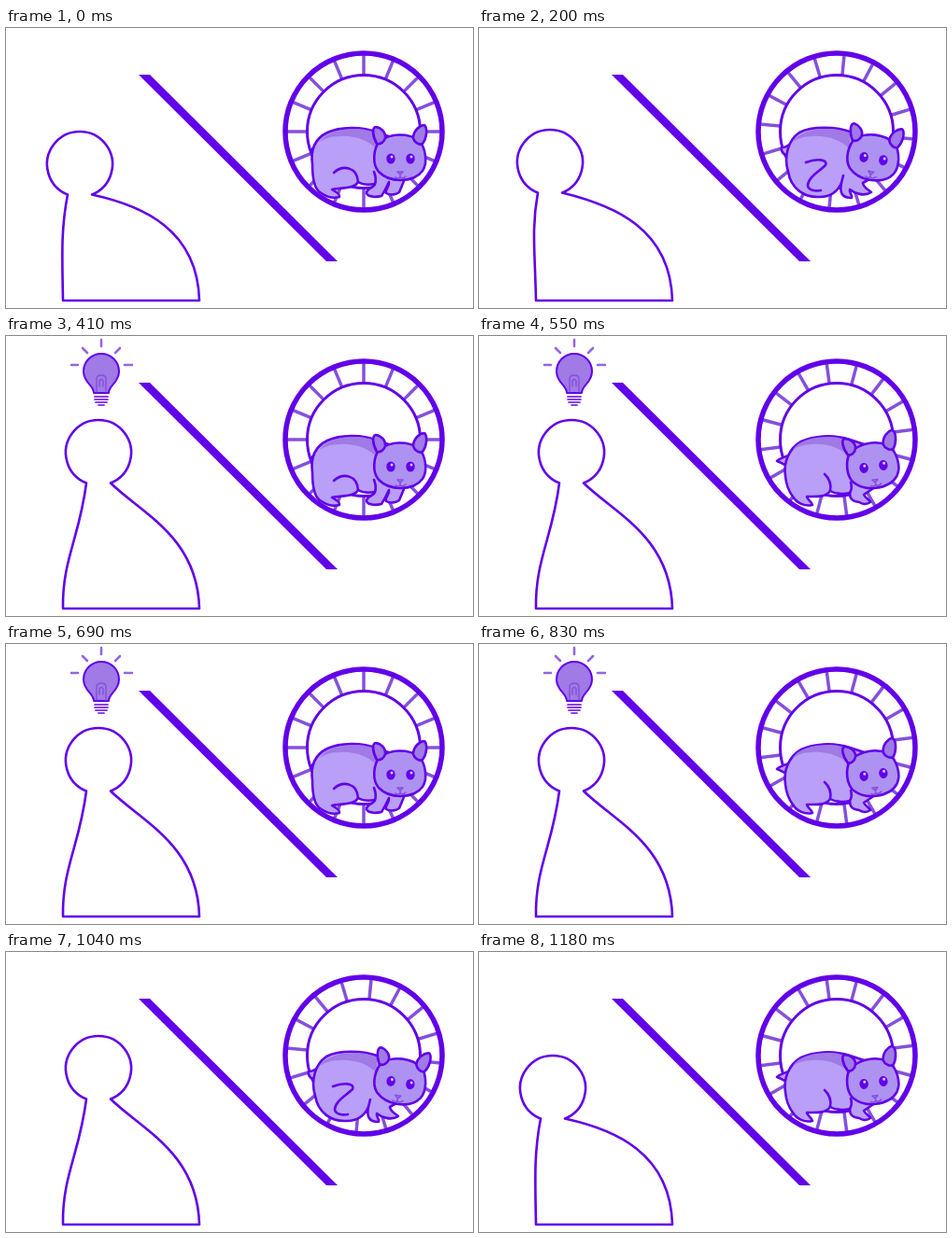
These frames come from a looping animation (500x300 px, 1380 ms). An HTML page:

```html
<!DOCTYPE html>
<html lang="en">
<meta charset="utf-8">
<title>Thinking and running</title>
<style>
html, body { margin: 0; width: 100%; height: 100%; overflow: hidden; background: #fff; }
svg { display: block; width: 500px; height: 300px; }
.line { fill: none; stroke: #6200ea; stroke-width: 2.6; stroke-linecap: round; stroke-linejoin: round; }
.light { fill: #b99ff8; }
.mid { fill: #a07ae5; }
.pale { stroke: #8550dc; }
</style>
<svg viewBox="0 0 500 300">
  <path id="bust" class="line"/>

  <g id="bulb" class="line">
    <path stroke="#9566e0" d="M102 4V11M82 13L87 18M122 13L117 18M70 31H77M127 31H135"/>
    <path class="mid" style="stroke-width:2" d="M94 61C94 53 83 50 83 38A19 19 0 0 1 121 38C121 50 110 53 110 61Z"/>
    <path class="pale" style="stroke-width:1.4" d="M97 60V46Q97 42 102 42T107 46V60M100 54V48Q102 45 104 48V54"/>
    <path style="stroke-width:1.7" d="M95 65H109M95 68H109M96 71H108M99 74H105"/>
  </g>

  <path fill="#6200ea" d="M142 50H154L355 250H343Z"/>

  <g class="line">
    <g id="spokes" class="pale" style="stroke-width:3.5;stroke-linecap:butt"></g>
    <circle cx="383" cy="111" r="84" style="stroke-width:5.5"/>
    <circle cx="383" cy="111" r="60.5" style="stroke-width:3"/>
  </g>

  <g class="line">
    <path id="tail" class="light"/>
    <path id="body" class="light"/>
    <path class="mid" stroke="none" d="M336 122C342 112 358 108 374 108C383 108 391 110 397 113V130C388 120 373 115 357 116C347 116 341 119 336 122Z"/>
    <path id="crease"/>
    <g id="head">
      <path fill="#ae92f2" d="M400 121C393 130 392 146 399 154C406 161 414 163 422 163C432 163 441 160 446 153C452 144 449 128 442 120C429 112 412 113 400 121Z"/>
      <path class="mid" d="M397 124C392 115 392 106 396 106C402 107 407 112 406 118C405 122 401 125 397 124Z"/>
      <path class="mid" d="M436 118C436 110 443 104 448 104C452 108 450 119 446 124C442 126 437 122 436 118Z"/>
      <g fill="#6200ea" stroke="none">
        <ellipse cx="412" cy="140" rx="4.7" ry="5.5"/>
        <ellipse cx="433" cy="140" rx="4.7" ry="5.5"/>
      </g>
      <g fill="#d9c9ff" stroke="none">
        <circle cx="413" cy="138" r="1.5"/>
        <circle cx="434" cy="138" r="1.5"/>
      </g>
      <path style="stroke-width:1.6" class="pale" d="M419 154H425L422 157ZM422 157V160M417 160Q420 162 422 160Q425 162 428 159"/>
    </g>
  </g>
</svg>
<script>
const $ = id => document.getElementById(id);
const LOOP = 1380, HOLD = 200, STEP = 70, LAST = 15;

// Wheel turn and head tilt in degrees, then the hamster's outlines
const poses = [
  {
    turn: 0,
    tilt: 0,
    tail: "M331 128Q326 128 328 137",
    body: "M397 112C381 105 357 106 344 112C330 119 326 132 328 146C328 157 329 171 336 176C343 181 350 183 357 181C358 177 352 175 349 173C362 171 373 172 377 165C382 168 390 168 395 167C394 172 386 171 386 177C388 182 398 181 402 180C406 174 408 169 410 165C411 171 405 173 407 177C412 180 418 178 421 176C423 171 426 165 428 158L438 125Z",
    crease: "M351 155C361 146 376 149 377 165M394 154Q397 162 395 167"
  },
  {
    turn: 5.6,
    tilt: 9,
    tail: "M332 136C327 137 323 133 324 128C328 128 332 126 335 122Z",
    body: "M400 112C382 105 356 105 343 112C331 120 326 138 331 154C334 172 348 182 365 181C376 181 384 175 388 166C386 176 388 182 399 182C400 178 396 177 397 173C402 177 412 181 420 176C416 172 412 172 411 166L430 155L438 125Z",
    crease: "M350 144C360 140 374 140 371 147C364 154 352 160 352 169C353 174 360 175 366 174M388 166L390 158"
  },
  {
    turn: 15,
    tilt: -8,
    tail: "M330 139C325 137 322 135 319 134C323 130 328 130 333 127Z",
    body: "M397 111C378 105 358 107 345 113C331 121 326 136 328 150C329 162 333 168 336 172C340 179 349 183 357 181C356 177 351 175 351 172C362 172 371 173 376 166C381 169 390 170 397 168C397 174 399 177 407 178C411 181 416 180 419 178C418 175 414 174 412 170L430 158L440 125Z",
    crease: "M370 148Q378 155 376 166M398 157Q400 163 397 168"
  }
];

// Head centre while lowered, lifting and raised
const headSpots = [[79, 146], [76, 144], [99, 125]];

for (let i = 0; i < 16; i++)
  $("spokes").innerHTML += `<path d="M383 50V28" transform="rotate(${i * 22.5} 383 111)"/>`;

function drawBust([x, y]) {
  $("bust").setAttribute("d", `M61 292C60 240 ${x - 20} 215 ${x - 13} ${y + 32.5}
    A35 35 0 1 1 ${x + 13} ${y + 32.5}C145 190 205 215 207 292Z`);
}

function drawHamster({ turn, tilt, ...parts }) {
  for (const id in parts) $(id).setAttribute("d", parts[id]);
  $("head").setAttribute("transform", `rotate(${tilt} 422 140)`);
  $("spokes").setAttribute("transform", `rotate(${turn} 383 111)`);
}

function render(now) {
  const t = now % LOOP;
  const step = t < HOLD ? 0 : Math.min(LAST, 1 + Math.floor((t - HOLD) / STEP));
  const fromEnd = Math.min(step, LAST - step);
  drawBust(headSpots[Math.min(fromEnd, 2)]);
  $("bulb").style.display = fromEnd > 2 ? "" : "none";
  drawHamster(poses[Math.min(step % 4, 2)]);
}

let start;
function tick(now) {
  start ??= now;
  render(now - start);
  requestAnimationFrame(tick);
}
render(0);
requestAnimationFrame(tick);
</script>
</html>
```
